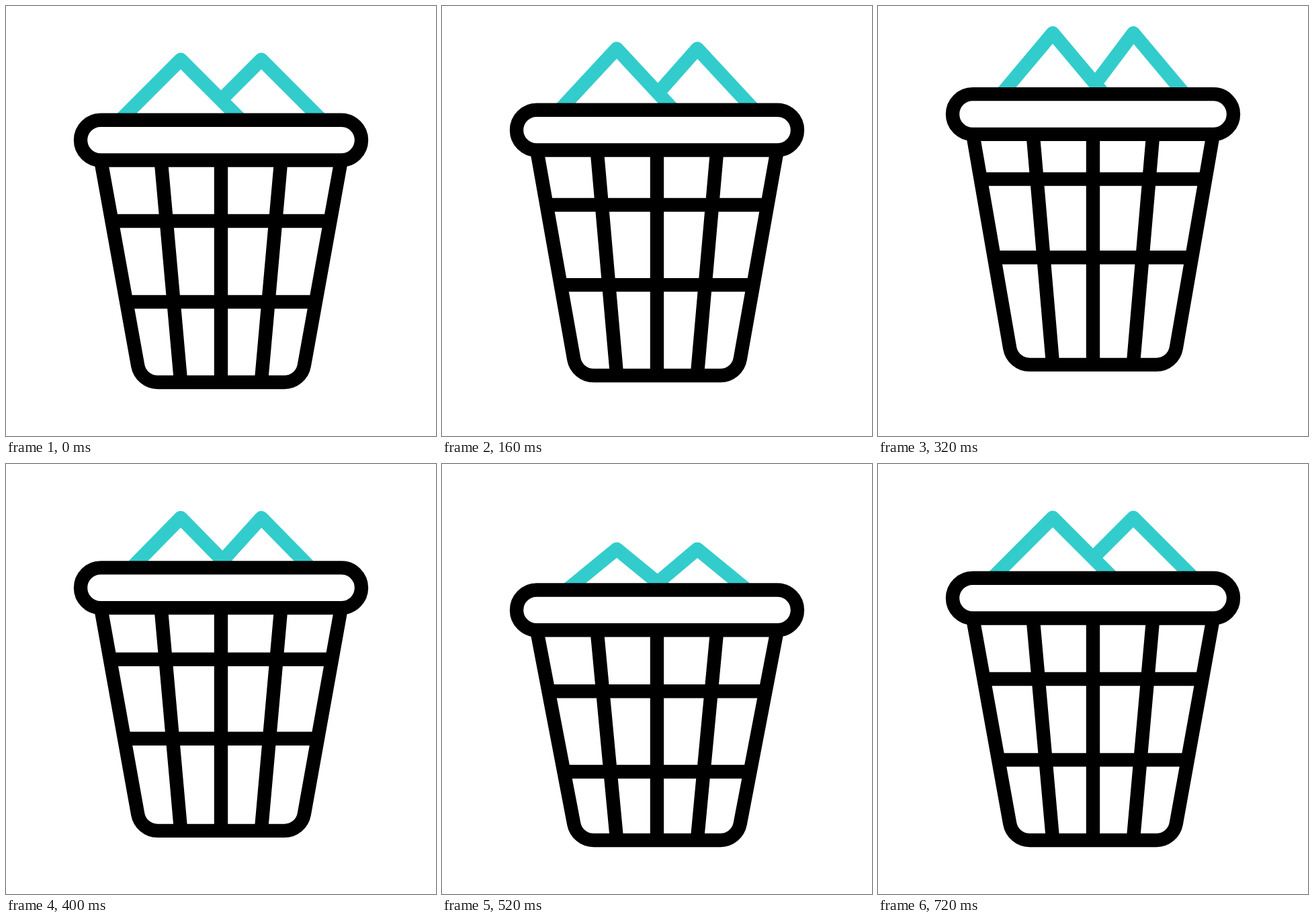
An HTML page that plays this animation: 640 by 640 pixels, repeating every 1480 ms.

```html
<!DOCTYPE html>
<html lang="en">
<head>
<meta charset="utf-8">
<title>Bouncing basket</title>
<style>
  html, body { margin: 0; width: 100%; height: 100%; overflow: hidden; background: #fff; }
  svg { display: block; width: 100%; height: 100%; }
  path, rect { fill: none; stroke: #000; stroke-width: 20.4; stroke-linejoin: round; }
  .paper { stroke: #3cc; fill: #fff; }
  .rim { fill: #fff; }
</style>
</head>
<body>
<svg viewBox="0 0 640 640">
  <path id="back" class="paper"/>
  <path id="front" class="paper"/>
  <path id="body"/>
  <path id="grid"/>
  <rect id="rim" class="rim" x="111" width="418" height="59.8" rx="29.9"/>
</svg>
<script>
const LOOP = 1480, STEP = 40;
const TIMES = [80, 280, 520, 720];

// Rest, stretched and squashed values; the flag marks parts with a sharp landing.
const parts = {
  rim:   [199.6, 157.1, 217.4, true],
  bar1:  [320, 252, 338.2, true],
  bar2:  [440.4, 368.5, 458, true],
  floor: [560, 531.8, 560, false],
  peak:  [79.8, 33.4, 126.6, false],
  slope: [1, 1.22, 0.82, false],
  inner: [1, 1.37, 0.845, false]
};

const $ = id => document.getElementById(id);

// Cubic ease from 0 to 1 with start speed a and end speed b.
function ease(u, a, b) {
  return u * u * (3 - 2 * u) + a * u * (1 - u) ** 2 - b * u * u * (1 - u);
}

function valueAt([rest, high, low, sharp], t) {
  if (t <= TIMES[0] || t >= TIMES[3]) return rest;
  const keys = [rest, high, low, rest];
  const i = t < TIMES[1] ? 0 : t < TIMES[2] ? 1 : 2;
  const u = (t - TIMES[i]) / (TIMES[i + 1] - TIMES[i]);
  const a = sharp && i === 2 ? 0.66 : 0;
  const b = sharp && i === 1 ? 0.4 : 0;
  return keys[i] + (keys[i + 1] - keys[i]) * ease(u, a, b);
}

function sheet(x, peak, foot, left, right) {
  const h = foot - peak;
  return `M${x - h / left} ${foot}L${x} ${peak}L${x + h / right} ${foot}`;
}

function draw(t) {
  const p = {};
  for (const k in parts) p[k] = valueAt(parts[k], t);

  $('back').setAttribute('d', sheet(380, p.peak, p.rim, p.inner, p.slope));
  $('front').setAttribute('d', sheet(260, p.peak, p.rim, p.slope, p.slope));
  $('rim').setAttribute('y', p.rim - 29.9);

  const top = p.rim + 36, bottom = p.floor, bend = bottom - 24.7;
  const x0 = 142.2, x1 = 196.2;
  $('body').setAttribute('d',
    `M${x0} ${top}L${x1} ${bend}A30 30 0 0 0 225.7 ${bottom}` +
    `H414.3A30 30 0 0 0 ${640 - x1} ${bend}L${640 - x0} ${top}`);

  const bar = y => {
    const x = x0 + (x1 - x0) * (y - top) / (bend - top);
    return `M${x} ${y}H${640 - x}`;
  };
  $('grid').setAttribute('d',
    bar(p.bar1) + bar(p.bar2) +
    `M231.2 ${top}L260.2 ${bottom}M320 ${top}V${bottom}M408.8 ${top}L379.8 ${bottom}`);
}

const start = performance.now();
function tick() {
  const t = (performance.now() - start) % LOOP;
  draw(Math.floor(t / STEP) * STEP);
  requestAnimationFrame(tick);
}
tick();
</script>
</body>
</html>
```
